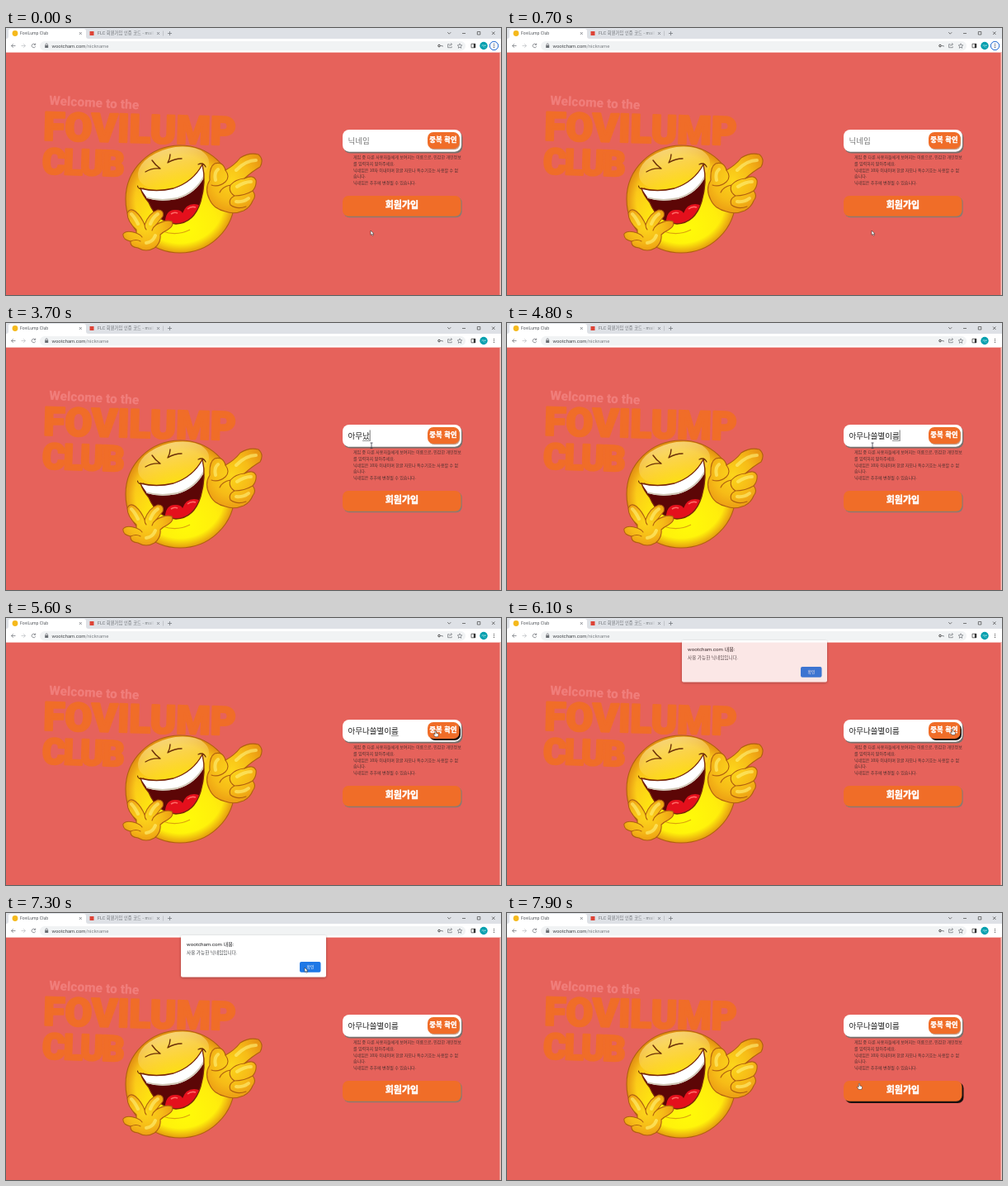
These frames come from a looping animation (600 by 323 pixels, 8000 ms). An HTML page:

```html
<!DOCTYPE html>
<html lang="ko">
<head>
<meta charset="utf-8">
<title>Nickname sign-up</title>
<style>
html, body { margin: 0; width: 100%; height: 100%; overflow: hidden; background: #e6625b; }
svg { display: block; width: 100vw; height: 100vh; }
text { font-family: Roboto, "Noto Sans CJK KR", "Noto Sans CJK JP", "Noto Sans CJK", sans-serif; white-space: pre; }
.ko { font-family: "Noto Sans CJK KR", "Noto Sans CJK JP", "Noto Sans CJK", sans-serif; }
.heavy { font-weight: 900; }
.title { fill: #f06d28; stroke: #f06d28; stroke-width: 2.4; stroke-linejoin: round; }
.label { fill: #fff; text-anchor: middle; }
.chunky { stroke: #fff; stroke-width: .5; stroke-linejoin: round; }
.icon { fill: none; stroke: #6b6f74; stroke-width: .7; }
.skin { stroke: #b0600f; stroke-width: 1.1; stroke-linejoin: round; }
.crease { fill: none; stroke: #b0600f; stroke-width: 1.1; stroke-linecap: round; }
.gleam { fill: none; stroke: #fff27a; stroke-width: 4; stroke-linecap: round; opacity: .6; }
</style>
</head>
<body>
<svg viewBox="0 0 600 323" preserveAspectRatio="none">
  <defs>
    <radialGradient id="face" cx=".56" cy=".78" r=".82">
      <stop offset="0" stop-color="#fffb08"/><stop offset=".35" stop-color="#ffee0c"/>
      <stop offset=".7" stop-color="#fbc91a"/><stop offset="1" stop-color="#eda416"/>
    </radialGradient>
    <radialGradient id="rim">
      <stop offset=".82" stop-color="#e08a10" stop-opacity="0"/><stop offset="1" stop-color="#dc8210" stop-opacity=".75"/>
    </radialGradient>
    <linearGradient id="shine" x2="0" y2="1">
      <stop offset="0" stop-color="#fff0a0" stop-opacity=".7"/><stop offset="1" stop-color="#ffe86a" stop-opacity="0"/>
    </linearGradient>
    <radialGradient id="hand" cx=".45" cy=".45" r=".62">
      <stop offset="0" stop-color="#fcd51b"/><stop offset=".55" stop-color="#f6bb17"/><stop offset="1" stop-color="#e99412"/>
    </radialGradient>
    <linearGradient id="fade">
      <stop offset="0" stop-color="#dee1e6" stop-opacity="0"/><stop offset="1" stop-color="#dee1e6"/>
    </linearGradient>
    <filter id="soft" x="-10%" y="-20%" width="120%" height="150%">
      <feDropShadow dx="0" dy="1" stdDeviation="1.5" flood-opacity=".35"/>
    </filter>
    <path id="lips" d="M163 194Q182 199 203 194Q227 186 238 165Q243 186 236 210Q228 236 206 237Q183 235 173 211Q166 203 163 194Z"/>
    <clipPath id="mouth"><use href="#lips"/></clipPath>
  </defs>

  <!-- browser tabs -->
  <rect width="600" height="14" fill="#dee1e6"/>
  <path d="M0 13Q3 13 3 10V3.500Q3 1 6 1H94Q97 1 97 3.500V10Q97 13 100 13Z" fill="#fff"/>
  <circle cx="11" cy="6.500" r="3.400" fill="#f5b91c"/>
  <text x="17" y="8.400" font-size="5.200" fill="#55595e">FoviLump Club</text>
  <rect x="101.500" y="4" width="5" height="5" fill="#dd4437"/>
  <text x="111" y="8.400" font-size="5.200" letter-spacing=".15" fill="#6b6f74">FLC 회원가입 인증 코드 - mail</text>
  <rect x="170" y="2" width="11" height="10" fill="url(#fade)"/>
  <rect x="181" y="2" width="9" height="10" fill="#dee1e6"/>
  <g class="icon">
    <path d="M88.800 5l3 3m0-3l-3 3M183 5l3 3m0-3l-3 3M196 6.500h5m-2.500-2.500v5"/>
    <path d="M190.500 3.500v6" stroke="#b5b9be"/>
    <path d="M535.200 5.200l2 2L539.200 5.200M553 6.500h4M571.300 4.500h3.500v3.500h-3.500ZM589 4.500l3.500 3.500m0-3.500l-3.500 3.500" stroke="#444"/>
  </g>

  <!-- browser toolbar -->
  <rect y="13" width="600" height="17" fill="#fff"/>
  <rect x="41" y="16" width="516" height="11.500" rx="5.700" fill="#f1f3f4"/>
  <g class="icon">
    <path d="M11.500 21.500H6.500m2.300-2.300l-2.300 2.300L8.800 23.800"/>
    <path d="M18.500 21.500H23.500m-2.300-2.300l2.300 2.300L21.200 23.800" stroke="#b9bcc0"/>
    <path d="M35.300 20a2.300 2.300 0 1 0 .4 2.200M35.700 18.500V20.400h-2"/>
    <path d="M48 21v-1a1.200 1.200 0 0 1 2.400 0v1"/>
    <path d="M526.500 21.500h2.700v1.300M537.600 19.700h-2v4h4.600v-1.400M537.500 22q.3-2.300 2.800-2.300m-1.200-1.400l1.500 1.400l-1.500 1.400"/>
    <path d="M550 18.800l.8 1.900 2 .2-1.500 1.400.4 2-1.700-1.100-1.700 1.100.4-2-1.500-1.400 2-.2Z"/>
    <path d="M564 19.200h4.800v4.600h-4.800Z" stroke="#333"/>
  </g>
  <rect x="47.200" y="20.900" width="4" height="3.100" fill="#6b6f74"/>
  <circle cx="525" cy="21.500" r="1.300" fill="none" stroke="#444"/>
  <rect x="566.800" y="19" width="2.200" height="5" fill="#333"/>
  <text x="55.500" y="23.600" font-size="5.900" fill="#45484c">wootcham.com<tspan fill="#7d8186">/nickname</tspan></text>
  <circle cx="579" cy="21.500" r="4.700" fill="#009fae"/>
  <text class="ko label" x="579" y="22.700" font-size="3.400">가온</text>
  <circle id="ring" cx="591.500" cy="21.500" r="5.200" fill="#eef3fd" stroke="#1a66d2" stroke-width="1"/>
  <path d="M591.500 18.900v1.100m0 .9v1.100m0 .9v1.100" stroke="#555" stroke-width="1.100"/>

  <!-- page -->
  <rect y="29.600" width="600" height="294" fill="#e6625b"/>
  <rect x="598.500" y="29.600" width="1.500" height="294" fill="#f3c2bb"/>
  <text class="heavy" transform="translate(52 92.800) rotate(3)" font-size="15.600" fill="#f07d7a">Welcome to the</text>
  <text class="heavy title" transform="translate(45 135.500) rotate(1.500)" font-size="47.500">FOVILUMP</text>
  <text class="heavy title" transform="translate(43.500 176) rotate(2)" font-size="43" letter-spacing="-2.500">CLUB</text>

  <!-- laughing face -->
  <ellipse cx="211" cy="207" rx="66" ry="65" fill="url(#face)"/>
  <ellipse class="skin" cx="211" cy="207" rx="66" ry="65" fill="url(#rim)"/>
  <ellipse cx="203" cy="170" rx="44" ry="25" fill="url(#shine)" transform="rotate(-14 203 170)"/>
  <g fill="none" stroke="#6b3007" stroke-width="1.400" stroke-linecap="round" stroke-linejoin="round">
    <path d="M177 160Q181 166 187 170Q177 169 169 174M199 153Q199 158 196 163Q204 158 213 158"/>
    <path d="M159.500 191Q160 196 167 194M233 165Q239 162 242 168" stroke-width="1.200"/>
  </g>
  <path d="M190 246Q207 252 223 244" fill="none" stroke="#dca20e" stroke-width="1.200"/>
  <g clip-path="url(#mouth)">
    <rect x="155" y="160" width="90" height="80" fill="#5c0606"/>
    <path d="M193 232Q195 219 206 220Q212 220 214 224Q218 213 228 213Q236 213 240 220V240H193Z" fill="#e4101c"/>
    <path d="M200 225Q204 222 208 224M220 219Q225 215 230 217" fill="none" stroke="#ff6a66" stroke-width="1.600"/>
    <path d="M160 190Q182 199 203 194Q227 186 239 162L242 177Q231 201 207 207Q187 211 171 206Z" fill="#fff"/>
    <path d="M170 205Q187 210 207 206Q231 199 241 177" fill="none" stroke="#cfc6b4" stroke-width="1.800"/>
  </g>
  <use href="#lips" fill="none" stroke="#782708" stroke-width="1.300"/>

  <!-- pointing hand -->
  <path class="skin" fill="url(#hand)" d="M247 208Q240 195 247 184Q246 168 253 164Q263 161 266 172Q277 166 284 157Q295 150 306 153Q313 159 308 168Q299 173 289 182Q300 177 303 184Q304 191 299 197Q304 203 299 209Q296 217 288 221Q276 226 266 222Q252 219 247 208Z"/>
  <path class="crease" d="M266 172Q272 180 266 186Q258 193 249 190M289 182Q278 183 272 190Q269 198 277 203Q289 203 299 197M277 203Q269 207 272 214Q280 220 291 216M272 190Q262 192 259 199"/>
  <path class="gleam" d="M279 172Q291 160 303 160M280 192Q289 186 297 186M279 210Q288 211 294 206M254 184Q252 175 257 171"/>

  <!-- open hand -->
  <path class="skin" fill="url(#hand)" d="M158 244Q147 234 147 224Q150 217 157 222Q164 228 168 238Q173 224 184 220Q192 220 190 228Q186 233 182 238Q194 231 201 234Q204 239 196 244Q190 247 187 250Q188 260 180 266Q170 272 160 266Q150 265 151 258Q141 256 142 249Q146 244 158 248Z"/>
  <path class="crease" d="M158 248Q163 250 165 253M151 258Q158 255 163 258M182 238Q178 241 177 245M168 238Q168 242 170 244"/>
  <path class="gleam" d="M152 225Q156 229 160 237M184 225Q178 229 175 237M170 260Q178 259 181 251"/>

  <!-- form -->
  <rect x="409.300" y="124.500" width="144" height="27" rx="8" fill="#77716e"/>
  <rect x="408" y="123" width="144" height="26.700" rx="8" fill="#fff"/>
  <text class="ko" id="field" x="414.500" y="139.700" font-size="9.500"></text>
  <rect id="under" y="142.200" width="8.700" height=".7" fill="#666"/>
  <rect id="caret" y="129.500" width=".8" height="13.500" fill="#555"/>
  <rect id="checkShade" x="511" y="126" width="38" height="20" rx="7"/>
  <rect x="511" y="126" width="38.500" height="20" rx="7" fill="#f06d28"/>
  <text class="ko heavy label chunky" x="530.200" y="137.600" font-size="7.800" letter-spacing=".5">중복 확인</text>
  <g id="help" fill="#4a2f2e"></g>
  <rect id="joinShade" x="408" y="203" width="143.500" height="25" rx="7"/>
  <rect x="408" y="203" width="143.500" height="24.700" rx="7" fill="#f06d28"/>
  <text class="ko heavy label chunky" x="480" y="218" font-size="11">회원가입</text>

  <!-- alert -->
  <g id="alert">
    <rect x="212" y="27" width="176" height="50.500" rx="2" fill="#fff" filter="url(#soft)"/>
    <text x="219" y="39.600" font-size="6.200" fill="#202124">wootcham.com 내용:</text>
    <text class="ko" x="219" y="50.200" font-size="5.600" fill="#45484c">사용 가능한 닉네임입니다.</text>
    <rect x="356" y="59" width="25.500" height="12.700" rx="2" fill="#1f78e6"/>
    <text class="ko label" x="369" y="67.200" font-size="4.900">확인</text>
  </g>

  <!-- pointers, hot spot at 0,0 -->
  <g id="pointer">
    <path id="arrow" d="M0 0V5.400L1.300 4.300L2.300 6.400L3.300 5.900L2.400 3.900H4Z" fill="#fff" stroke="#222" stroke-width=".5"/>
    <path id="beam" d="M-1.500-3H1.500M0-3V3.500M-1.500 3.500H1.500" fill="none" stroke="#3d3d4c" stroke-width=".8"/>
    <path id="finger" d="M-.7-2.500Q0-3.500.7-2.500V0L3 .7Q3.800 1.200 3.300 3L2.700 4.500H-.7L-2.700 1.500Q-2.300.500-.7 1.500Z" fill="#fff" stroke="#222" stroke-width=".5"/>
  </g>
</svg>

<script>
const $ = id => document.getElementById(id);
const set = (id, attrs) => { for (const k in attrs) $(id).setAttribute(k, attrs[k]); };
const show = (id, on) => set(id, { visibility: on ? 'visible' : 'hidden' });

const LOOP = 8000, STEP = 100;

// One entry per key press, as the input method composes the syllables.
const typed = [
  [3000, ['ㅇ', '아']],
  [3300, ['암', '아무', '아문', '아무나', '아무났', '아무나쓰', '아무나쓸']],
  [4100, ['ㅂ', '벼', '별', '별ㅇ', '별이', '별일', '별이르', '별이름'].map(s => '아무나쓸' + s)]
];

// time, x, y
const path = [
  [0, 442, 245], [1200, 442, 245], [1600, 443, 148], [5100, 443, 148],
  [5800, 540, 137], [6300, 540, 137], [7200, 362, 66], [7400, 362, 66],
  [7800, 427, 209], [LOOP, 427, 209]
];

['게임 중 다른 사용자들에게 보여지는 이름으로, 민감한 개인정보', '를 입력하지 말아주세요.',
 '닉네임은 10자 이내이며 한글 자모나 특수기호는 사용할 수 없', '습니다.',
 '닉네임은 추후에 변경될 수 있습니다.'].forEach((line, i) => {
  const el = document.createElementNS('http://www.w3.org/2000/svg', 'text');
  el.textContent = line;
  el.setAttribute('class', 'ko');
  el.setAttribute('x', 421);
  el.setAttribute('y', 158.3 + i * 7.6);
  el.setAttribute('font-size', 5);
  $('help').append(el);
});

function textAt(t) {
  let s = '';
  for (const [start, keys] of typed)
    if (t >= start) s = keys[Math.min(keys.length - 1, Math.floor((t - start) / STEP))];
  return s;
}

function pointerAt(t) {
  const i = path.findIndex(p => p[0] > t);
  const [t0, x0, y0] = path[i - 1], [t1, x1, y1] = path[i];
  const u = (t - t0) / (t1 - t0), e = u * u * (3 - 2 * u);
  return [x0 + (x1 - x0) * e, y0 + (y1 - y0) * e];
}

const inside = (x, y, l, t, r, b) => x >= l && x <= r && y >= t && y <= b;

function shade(id, hover, idle) {
  const d = hover ? 2 : 1.2;
  set(id, { transform: `translate(${d} ${d})`, fill: hover ? '#1a1110' : idle });
}

function draw(t) {
  const [x, y] = pointerAt(t);
  const overCheck = inside(x, y, 511, 126, 549, 146);
  const overJoin = inside(x, y, 408, 203, 552, 228);
  const overField = !overCheck && inside(x, y, 408, 123, 552, 150);
  set('pointer', { transform: `translate(${x} ${y})` });
  show('finger', overCheck || overJoin);
  show('beam', overField);
  show('arrow', !(overCheck || overJoin || overField));
  shade('checkShade', overCheck, '#c9a08a');
  shade('joinShade', overJoin, '#8c7a70');

  const text = textAt(t), field = $('field');
  field.textContent = text || '닉네임';
  set('field', { fill: text ? '#1c1c1c' : '#777' });
  const end = 414.5 + (text ? field.getComputedTextLength() : 0);
  set('caret', { x: end });
  set('under', { x: end - 8.7 });
  show('caret', t >= 2100 && t < 2600 || t >= 3000 && t < 5300);
  show('under', text && t < 5800);

  show('ring', t < 2100);
  show('alert', t >= 6100 && t < 7500);
  set('alert', { opacity: t < 6200 ? .85 : 1 });
}

function frame() {
  const t = performance.now() % LOOP;
  draw(Math.floor(t / STEP) * STEP);
  requestAnimationFrame(frame);
}
frame();
</script>
</body>
</html>
```
